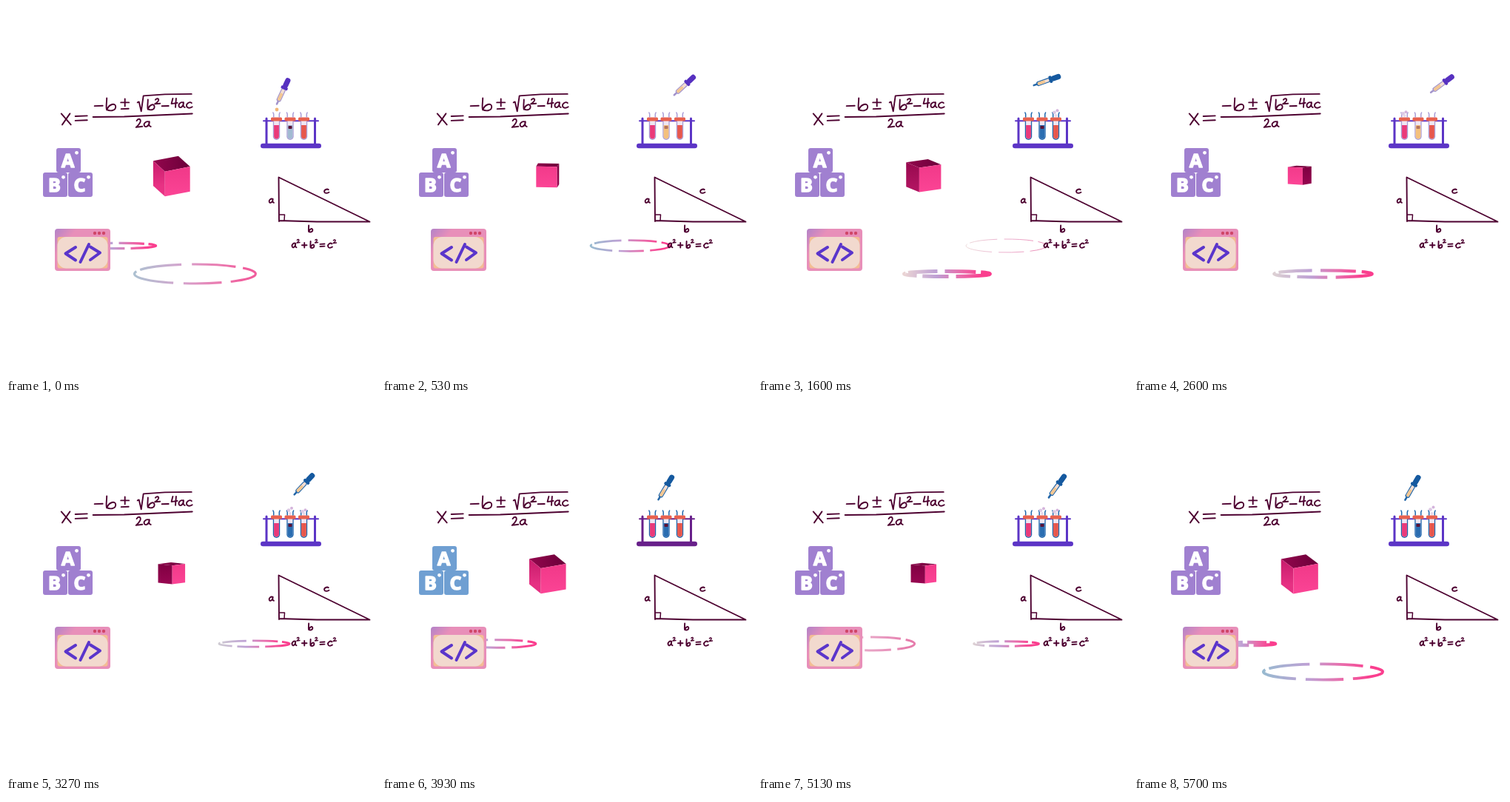
An HTML page with a canvas for the animation above (5.73 s loop, 500 by 500 pixels).

```html
<!DOCTYPE html>
<html lang="en">
<head>
<meta charset="utf-8">
<title>Maths and science stickers</title>
<style>
html, body { margin: 0; width: 100%; height: 100%; overflow: hidden; background: #fff; }
canvas { display: block; width: 500px; height: 500px; }
</style>
</head>
<body>
<canvas id="stage" width="500" height="500"></canvas>
<script>
const ctx = document.getElementById('stage').getContext('2d');
const LOOP = 5730;
const INK = '#4d0030';
const STARTS = [0, 70, 100, 130, 170]; // five pictures per 200 ms
const rad = d => d * Math.PI / 180;
const clamp = v => Math.max(0, Math.min(1, v));

function mix(a, b, k) {
  return 'rgb(' + a.map((v, i) => Math.round(v + (b[i] - v) * k)).join(',') + ')';
}

function trace(points) {
  ctx.beginPath();
  points.forEach(([x, y], i) => i ? ctx.lineTo(x, y) : ctx.moveTo(x, y));
}

function line(points, color, width) {
  trace(points);
  ctx.strokeStyle = color;
  ctx.lineWidth = width;
  ctx.stroke();
}

function poly(points, fill) {
  trace(points);
  ctx.closePath();
  ctx.fillStyle = fill;
  ctx.fill();
}

function box(x, y, w, h, r, fill) {
  ctx.beginPath();
  ctx.roundRect(x, y, w, h, r);
  ctx.fillStyle = fill;
  ctx.fill();
}

function dot(x, y, r, fill) {
  ctx.beginPath();
  ctx.arc(x, y, r, 0, 7);
  ctx.fillStyle = fill;
  ctx.fill();
}

// Handwriting, each letter in a 10 by 10 box
const GLYPHS = {
  a: 'M8 2C5 -1 0 3 1 7C2 11 7 9 8 3L8 1C7 5 8 9 10 9',
  b: 'M1 0C1 4 0 7 1 9.5C3 4.5 9 3.5 9 7C9 10.5 3 10.5 1 9',
  c: 'M9 2C6 -1 0 3 1 7C2 11 7 10 10 8',
  x: 'M0 0L10 10M9 0L1 10',
  2: 'M1 2C3 -1 8 -1 7 3C6 6 3 8 0 10L10 9',
  4: 'M3 0L1 6L10 5M8 0L7 10',
  '+': 'M5 0L5 10M0 5L10 5',
  '=': 'M0 1L10 0M0 10L10 9',
  '-': 'M0 6L10 4'
};

function write(ch, x, y, w, h, width = 1.9) {
  const path = new Path2D();
  path.addPath(new Path2D(GLYPHS[ch]), new DOMMatrix([w / 10, 0, 0, h / 10, x, y]));
  ctx.strokeStyle = INK;
  ctx.lineWidth = width;
  ctx.stroke(path);
}

function formula() {
  ctx.save();
  ctx.translate(-0.3, -0.6);
  write('x', 75, 146, 13, 15);
  write('=', 94, 149, 16, 6.5);
  write('-', 120, 134.5, 11, 2);
  write('b', 135, 125, 15, 17);
  write('+', 155.5, 126, 11, 10);
  write('-', 156, 138.5, 10, 2);
  line([[178, 131], [180, 130], [183, 143], [186, 122], [215, 120], [251, 119.5]], INK, 1.9);
  write('b', 191, 127, 11, 14);
  write('2', 201.5, 126, 7, 7);
  write('-', 211, 135, 9, 1.5);
  write('4', 223, 125.5, 9, 12);
  write('a', 233, 130, 9, 8.5);
  write('c', 243.5, 130, 8.5, 8.5);
  line([[118, 150.5], [160, 150], [252, 146]], INK, 2);
  write('2', 176, 153.5, 8.5, 11);
  write('a', 186, 156, 10, 8.5);
  ctx.restore();
}

function triangle() {
  line([[369, 291], [368.5, 231.5], [491.5, 291.5], [420, 291.5], [369, 290]], INK, 1.9);
  line([[370, 282], [376.5, 282], [376, 290]], INK, 1.5);
  write('a', 355, 260, 7, 6.5);
  write('c', 429.5, 247, 7, 6);
  write('b', 408.5, 296.5, 6.5, 9);
  write('a', 386, 320, 6.5, 7);
  write('2', 393, 315.5, 4, 4.5, 1.4);
  write('+', 400, 320, 6.5, 6.5);
  write('b', 411, 318, 6, 9);
  write('2', 417.5, 315.5, 4, 4.5, 1.4);
  write('=', 424.5, 321.5, 6, 3.5);
  write('c', 434.5, 320, 6.5, 7);
  write('2', 442, 316, 4.5, 4.5, 1.4);
}

function blocks(fill) {
  ctx.font = 'bold 25px "Open Sans", sans-serif';
  ctx.textAlign = 'center';
  for (const [ch, x, y] of [['A', 68, 192], ['B', 50, 225], ['C', 84, 225]]) {
    box(x, y, 33, 33, 3, fill);
    ctx.fillStyle = ctx.strokeStyle = '#fff';
    ctx.lineWidth = 1.6;
    ctx.fillText(ch, x + 15.5, y + 26);
    ctx.strokeText(ch, x + 15.5, y + 26);
    dot(x + 27.5, y + 6.3, 2.4, '#fff');
  }
}

function codeWindow() {
  const frame = ctx.createLinearGradient(66, 301, 84, 316);
  frame.addColorStop(0, '#b282c8');
  frame.addColorStop(1, '#e88fb9');
  box(66, 301, 75, 57, 4, frame);
  box(69.5, 312, 68, 42.5, 3, '#f3bd94');
  box(69.5, 312, 68, 42.5, 12, '#f2d9ce');
  for (const x of [120, 126, 132]) dot(x, 307, 2.2, '#cf4668');
  const c = '#5a35cb';
  line([[94, 326], [80.5, 334.5], [94, 343.5]], c, 4);
  line([[112, 322], [100.5, 346]], c, 4);
  line([[114, 325.5], [127, 333.5], [114, 343]], c, 4);
}

// A ripple grows quickly, opens up, then thins out.
function ripple(age, cx, cy, rx, ry, size) {
  if (age > 10.5) return;
  const w = rx * (1 - 0.45 * Math.exp(-age / 2.5));
  const h = ry * (0.18 + 0.82 * clamp(age / 9));
  const thin = Math.max(0, age - 8);
  const cool = clamp((age - 1) / 6), late = clamp(thin / 2);
  const g = ctx.createLinearGradient(cx - w, 0, cx + w, 0);
  g.addColorStop(0, mix([234, 212, 212], [152, 186, 208], cool * (1 - late * late)));
  g.addColorStop(0.38, mix([190, 160, 212], [232, 170, 200], late));
  g.addColorStop(0.65, mix([232, 110, 172], [232, 150, 190], late));
  g.addColorStop(0.9, mix([250, 62, 142], [230, 125, 172], late));
  ctx.strokeStyle = g;
  ctx.lineWidth = (3.8 + 1.2 * Math.exp(1 - age)) * size * (1 - 0.17 * thin * thin);
  const drift = 3 * Math.max(0, 9 - age);
  const gaps = [59 + drift, 106 + drift, 200, 262, 317];
  gaps.forEach((from, i) => {
    const to = i < 4 ? gaps[i + 1] : gaps[0] + 360;
    ctx.beginPath();
    ctx.ellipse(cx, cy, w, h, 0, rad(from + 5), rad(to - 5));
    ctx.stroke();
  });
}

// Half a turn per cycle, shrinking and levelling out midway
function cube(ph) {
  const u = ph / 48, dip = Math.sin(Math.PI * u);
  const s = 1 - 0.5 * dip ** 2.6;
  const turn = -180 * (1 - Math.exp(-((u / 0.52) ** 2.6)));
  const tilt = rad(25 - 22 * dip);
  const r = 26.5 * s, half = r * 0.7;
  const spot = (deg, y) => [
    223.8 + r * Math.sin(rad(deg)),
    230 - 1.5 * dip + y * Math.cos(tilt) + r * Math.cos(rad(deg)) * Math.sin(tilt)
  ];
  const edges = [0, 1, 2, 3].map(k => turn - 20 + 90 * k);
  const shade = ctx.createLinearGradient(200, 0, 248, 0);
  shade.addColorStop(0, '#93064d');
  shade.addColorStop(1, '#6b0039');
  poly(edges.map(e => spot(e, -half)), shade);
  const lit = clamp((s - 0.88) / 0.12);
  edges.forEach((e, k) => {
    if (Math.cos(rad(e + 45)) < 0) return;
    const a = spot(e, -half), b = spot(e + 90, -half);
    const c = spot(e + 90, half), d = spot(e, half);
    const g = ctx.createLinearGradient(...a, ...d);
    g.addColorStop(0, k % 2 ? mix([128, 0, 66], [200, 28, 108], lit) : '#f23a8a');
    g.addColorStop(1, k % 2 ? mix([150, 6, 80], [232, 50, 132], lit) : '#fb4495');
    poly([a, b, c, d], g);
  });
}

function tubes(ph, cool, rack) {
  const glass = cool ? '#1f66ac' : '#a99cd6';
  const orange = ph >= 12 && ph < 22, dark = ph >= 22 && ph < 32;
  const second = orange ? '#f4c07c' : dark ? '#45145f' : cool ? '#2a6db1' : '#a2bad2';
  line([[348, 155.3], [422, 155.3]], rack, 2);
  [dark ? '#c891c6' : '#ea3a7a', second, '#e6574d'].forEach((liquid, i) => {
    const x = 365.5 + 18.5 * i;
    box(x - 4.7, 154, 9.4, 27, [0, 0, 5, 5], glass);
    box(x - 3.4, 155, 6.8, 24.5, [0, 0, 4, 4], '#efe6f2');
    box(x - 3.4, 161, 6.8, 18.5, [0, 0, 4, 4], liquid);
    if (i === 1) box(x - 2.5, 162, 5, 4, 1, orange ? '#b5745e' : '#5b1236');
    box(x - 7.5, 150.5, 15, 5, 1.5, '#e8614f');
    for (const side of [-1, 1]) {
      line([[x + side * 3.8, 150], [x + side * 3.8, 146], [x + side * 4.6, 144]], glass, 1.5);
    }
    // Foam rises some time after each drop.
    const k = (ph - 14 - 8 * i) / 14;
    if (k < 0 || k > 1.2) return;
    dot(x - 2, 146 - 3 * k, 2.4, '#dcc8e4');
    dot(x + 2, 144 - 4 * k, 2, '#d4b4dc');
    dot(x, 148, 2, '#e6d6ea');
  });
  for (const x of [352, 417.5]) line([[x, 152], [x, 188]], rack, 3);
  box(344, 185.7, 82, 6.6, 3.3, rack);
}

// Hops between the tubes: start, end, from x, to x, lift
const HOPS = [[0, 9, 366, 385, 8], [9, 22, 385, 404, 18], [29, 48, 404, 366, 27]];

function pipette(ph, cool) {
  const hop = HOPS.filter(h => h[0] <= ph).pop();
  const [start, end, from, to, lift] = hop;
  const k = clamp((ph - start) / (end - start));
  const rise = lift * Math.sin(Math.PI * k) ** 2;
  const edge = cool ? '#2467a8' : '#a394cc';
  const bulb = cool ? '#15599f' : '#5731c0';
  ctx.save();
  ctx.translate(from + (to - from) * (1 - (1 - k) ** 2), 132.5 - rise);
  ctx.rotate(rad(25 + 1.8 * rise));
  line([[0, 0], [0, -5]], edge, 2.6);
  box(-3.2, -23, 6.4, 19, 2.5, edge);
  box(-2, -22, 4, 16.5, 1.5, '#f1dcd2');
  box(-2, -16, 4, 10.5, 1.5, '#f2c692');
  box(-4.8, -26, 9.6, 4, 1.5, bulb);
  box(-3.6, -38.5, 7.2, 14, 3.4, bulb);
  ctx.restore();
  for (const [x, at] of [[366, 47], [385, 9], [404, 27]]) {
    const fall = (ph - at + 48) % 48;
    if (fall < 2) dot(x, 136 + 4 * fall, 2.4, '#f2b878');
  }
}

function draw(n) {
  const ph = n % 48;
  const cool = n > 0 && (ph >= 32 || ph < 9);
  const blue = cool && ph >= 2 && ph < 9;
  ctx.fillStyle = '#fff';
  ctx.fillRect(0, 0, 500, 500);
  ctx.lineCap = 'butt';
  ctx.lineJoin = 'round';
  ripple((n + 2.5) % 24, 155, 324, 57, 9, 0.8);
  ripple((n + 9) % 24, 255.5, 362, 83, 13, 1);
  ripple((n + 18) % 24, 335.5, 324, 55, 9, 0.7);
  ctx.lineCap = 'round';
  formula();
  triangle();
  blocks(blue ? '#6f9fd2' : '#a080d0');
  codeWindow();
  cube(ph);
  tubes(ph, cool, blue ? '#68208a' : '#5c35c6');
  pipette(ph, cool);
}

const origin = performance.now();
function tick() {
  const t = (performance.now() - origin) % LOOP;
  const step = STARTS.filter(s => s <= t % 200).length - 1;
  draw(Math.floor(t / 200) * 5 + step);
  requestAnimationFrame(tick);
}
tick();
</script>
</body>
</html>
```
